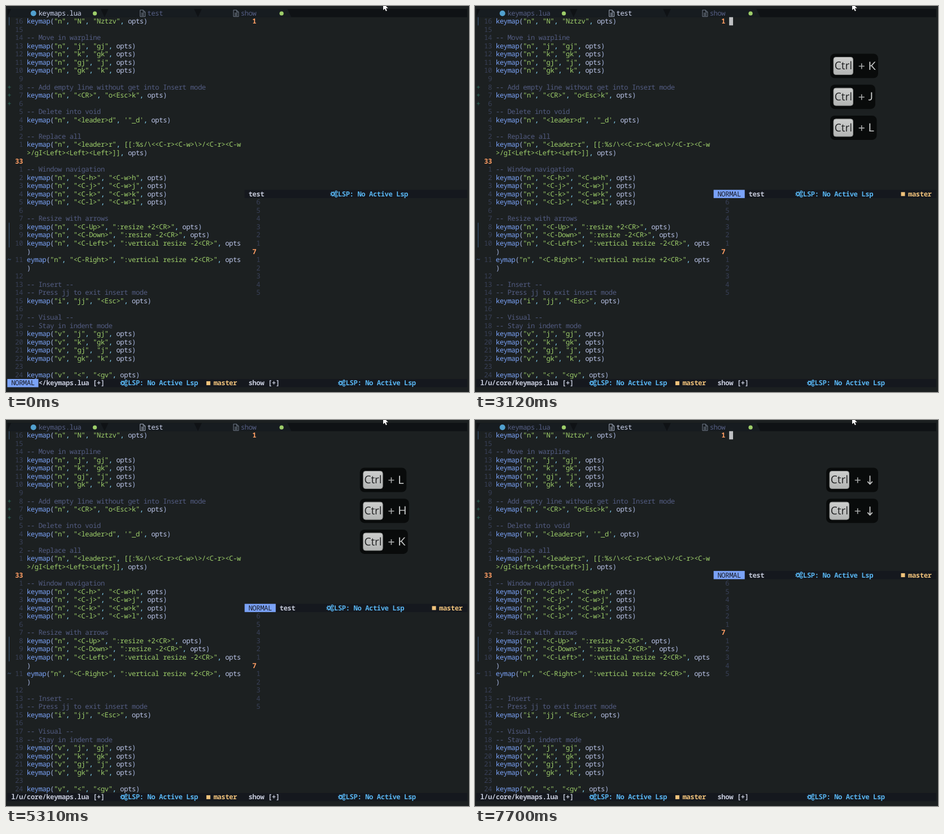
An HTML page for the animation above (8000 ms loop, 820 by 683 pixels).

```html
<!DOCTYPE html>
<html lang="en">
<head>
<meta charset="utf-8">
<title>Editor window navigation</title>
<style>
  html, body { margin: 0; width: 100%; height: 100%; overflow: hidden; background: #1c2021; }
  svg { display: block; width: 820px; height: 683px; }
  text {
    white-space: pre; text-rendering: geometricPrecision; letter-spacing: -.46px;
    font: 500 12.25px "Noto Sans Mono", "DejaVu Sans Mono", monospace;
  }
  .b { font-weight: 700; }
  .fn { fill: #7aa2f7; }
  .str { fill: #9ece6a; }
  .com { fill: #535c82; }
  .tab { fill: #565f85; }
  .tab-on { fill: #cdd4ee; }
  .comma { fill: #89ddff; }
  .par { fill: #a4b4de; }
  .id { fill: #bcc6ea; }
  .num { fill: #394058; }
  .cur { fill: #ff9e64; }
  .add { fill: #2c6e5e; }
  .mod { fill: #4a668f; }
  .lsp { fill: #58b4f0; }
  .git { fill: #f0c27b; }
  .mode { fill: #1a1c28; }
  .name { fill: #c3c8d8; }
  .ctrl, .key { letter-spacing: 0; }
  .ctrl { font: 500 19px "Open Sans", "Noto Sans", sans-serif; fill: #202122; }
  .key { font: 20px Lato, "Open Sans", sans-serif; fill: #c4c6c6; }
</style>
</head>
<body>
<svg viewBox="0 0 820 683" xmlns="http://www.w3.org/2000/svg">
  <defs>
    <linearGradient id="cap" x2="0" y2="1">
      <stop offset="0" stop-color="#cdcecd"/><stop offset="1" stop-color="#b3b5b4"/>
    </linearGradient>
    <g id="gears" fill="none" stroke="#58b4f0">
      <circle cx="4.6" cy="7.3" r="2.6" stroke-width="1.7"/>
      <circle cx="4.6" cy="7.3" r="4" stroke-width="1.2" stroke-dasharray="1.6 1.54"/>
      <circle cx="10.6" cy="4" r="1.7" stroke-width="1.3"/>
      <circle cx="10.6" cy="4" r="2.7" stroke-width=".8" stroke-dasharray="1.3 1.1"/>
      <circle cx="10.6" cy="10.8" r="1.7" stroke-width="1.3"/>
      <circle cx="10.6" cy="10.8" r="2.7" stroke-width=".8" stroke-dasharray="1.3 1.1"/>
    </g>
    <path id="file" d="M1 2h5.5l3.5 3.5v8H1zM6.5 2v3.5h3.5M3 7.5h5M3 9.5h5M3 11.5h5" fill="none" stroke-width="1"/>
  </defs>
  <g id="page"></g>
  <g id="live"></g>
  <g id="pills"></g>
  <path d="M668-5V7.2l2.8-2.5 2 4.4 2-.9-2-4.2h3.9z" fill="#fff"/>
</svg>
<script>
const CW = 6.89, RH = 14.55, LOOP = 8000;
const px = col => 2.3 + col * CW;
const py = row => 5.2 + row * RH;
const $ = id => document.getElementById(id);
const esc = s => s.replace(/&/g, '&amp;').replace(/</g, '&lt;');

const put = (col, row, text, cls) =>
  `<text x="${px(col)}" y="${py(row) + 11.4}" class="${cls}">${esc(text)}</text>`;
const box = (col, row, cols, fill) =>
  `<rect x="${px(col)}" y="${py(row)}" width="${cols * CW}" height="${RH}" fill="${fill}"/>`;
const use = (id, col, row, stroke) =>
  `<use href="#${id}" x="${px(col)}" y="${py(row)}" stroke="${stroke || 'none'}"/>`;

// Each line: sign, number, code, separated by tabs.
const code = String.raw`|	16	keymap("n", "N", "Nztzv", opts)
	15
	14	-- Move in warpline
	13	keymap("n", "j", "gj", opts)
	12	keymap("n", "k", "gk", opts)
	11	keymap("n", "gj", "j", opts)
	10	keymap("n", "gk", "k", opts)
	 9
+	 8	-- Add empty line without get into Insert mode
+	 7	keymap("n", "<CR>", "o<Esc>k", opts)
+	 6
	 5	-- Delete into void
	 4	keymap("n", "<leader>d", '"_d', opts)
	 3
	 2	-- Replace all
	 1	keymap("n", "<leader>r", [[:%s/\<<C-r><C-w>\>/<C-r><C-w
		>/gI<Left><Left><Left>]], opts)
	33
	 1	-- Window navigation
	 2	keymap("n", "<C-h>", "<C-w>h", opts)
	 3	keymap("n", "<C-j>", "<C-w>j", opts)
	 4	keymap("n", "<C-k>", "<C-w>k", opts)
	 5	keymap("n", "<C-l>", "<C-w>l", opts)
	 6
	 7	-- Resize with arrows
|	 8	keymap("n", "<C-Up>", ":resize +2<CR>", opts)
|	 9	keymap("n", "<C-Down>", ":resize -2<CR>", opts)
|	10	keymap("n", "<C-Left>", ":vertical resize -2<CR>", opts
		)
~	11	eymap("n", "<C-Right>", ":vertical resize +2<CR>", opts
		)
	12
	13	-- Insert --
	14	-- Press jj to exit insert mode
	15	keymap("i", "jj", "<Esc>", opts)
	16
	17	-- Visual --
	18	-- Stay in indent mode
	19	keymap("v", "j", "gj", opts)
	20	keymap("v", "k", "gk", opts)
	21	keymap("v", "gj", "j", opts)
	22	keymap("v", "gk", "k", opts)
	23
	24	keymap("v", "<", "<gv", opts)`.split('\n');

const TOKEN = /--.*|"[^"]*"|'[^']*'|\[\[.*|>\/gI.*\]\]|k?eymap|opts|[(),]/g;
function kind(tok) {
  if (tok.startsWith('--')) return 'com';
  if (/^["'[>]/.test(tok)) return 'str';
  if (tok.endsWith('eymap')) return 'fn';
  if (tok === 'opts') return 'id';
  return tok === ',' ? 'comma' : 'par';
}

function codeLine(line, i) {
  const [sign, num = '', src = ''] = line.split('\t'), row = i + 1;
  let out = put(2, row, num, num === '33' ? 'cur b' : 'num');
  if (sign === '|') out += `<rect x="5" y="${py(row)}" width="1.1" height="${RH}" fill="#3a5878"/>`;
  else if (sign) out += put(0, row, sign, sign === '+' ? 'add' : 'mod');
  for (const m of src.matchAll(TOKEN)) out += put(5 + m.index, row, m[0], kind(m[0]));
  return out;
}

function tabShape(a, b) {
  const top = py(0), bottom = py(1);
  return `<path d="M${px(a)} ${bottom}L${px(a + 1)} ${top}H${px(b - 1)}L${px(b)} ${bottom}z" fill="#171c20"/>`;
}

const dot = col => `<circle cx="${px(col + .5)}" cy="13.2" r="3.6" fill="#9ece6a"/>`;

$('page').innerHTML = box(0, 0, 118.2, '#0f1215') +
  tabShape(0, 25) + tabShape(25, 49) + tabShape(49, 73) +
  '<circle cx="48.6" cy="13" r="5" fill="#51a0cf"/>' + dot(22) + dot(70) +
  code.map(codeLine).join('') +
  put(63, 1, '1', 'cur b') + box(0, 45, 118.2, '#15181e');

function lsp(col, row) {
  return use('gears', col, row) + put(col + 2, row, 'LSP: No Active Lsp', 'lsp b');
}
function branch(col, row) {
  return `<rect x="${px(col) + 1.2}" y="${py(row) + 4}" width="7" height="7" fill="#f0c27b"/>` +
    put(col + 2, row, 'master', 'git b');
}
function mode(col, row) {
  return box(col, row, 8, '#7aa2f7') + put(col + 1, row, 'NORMAL', 'mode');
}
function rightBar(row, label, lspCol, focused) {
  return focused
    ? mode(61, row) + put(70, row, label, 'name b') + lsp(lspCol - 1, row) + branch(109, row)
    : put(62, row, label, 'name b') + lsp(lspCol, row);
}

function drawLive({ focus, split, cursor }) {
  const shade = w => focus === w ? 'tab-on' : 'tab';
  const ink = w => focus === w ? '#a3acbd' : '#737d8b';
  let out = put(8, 0, 'keymaps.lua', shade('left')) +
    use('file', 34, 0, ink('up')) + put(36, 0, 'test', shade('up')) +
    use('file', 58, 0, ink('down')) + put(60, 0, 'show', shade('down'));

  out += focus === 'left'
    ? mode(0, 45) + put(8, 45, '</keymaps.lua [+]', 'name b')
    : put(1, 45, 'l/u/core/keymaps.lua [+]', 'name b');
  out += lsp(29, 45) + branch(51, 45);
  out += box(61, split, 57.2, '#15181e') + rightBar(split, 'test', 83, focus === 'up');
  out += rightBar(45, 'show [+]', 85, focus === 'down');

  for (let i = 1; i <= 12; i++) {
    out += i === 7 ? put(63, split + i, '7', 'cur b') : put(64, split + i, '' + Math.abs(7 - i), 'num');
  }
  const spot = { left: [5, 18], up: [65, 1], down: [66, split + 7] }[focus];
  if (cursor) out += box(...spot, 1, '#bfc1c3');
  $('live').innerHTML = out;
}

// Key, time shown, start of fade, time gone.
const presses = [
  ['L', 1240, 4180, 4340], ['J', 2140, 5160, 5310], ['K', 3050, 6070, 6140],
  ['H', 3790, 6790, 6870], ['L', 4500, 7530, 7610],
  ['↓', 7210, 9000, 9000], ['↓', 7610, 9000, 9000]
];
const widths = { J: 80, L: 82.5, K: 85, H: 87, '↓': 92 };

function pill(key, x, y, alpha) {
  const glyph = key === '↓'
    ? `<path d="M${x + 77.5} ${y + 14}v15m-4.3-4.6l4.3 4.6 4.3-4.6" fill="none" stroke="#c4c6c6" stroke-width="1.8"/>`
    : `<text x="${x + 67.5}" y="${y + 28}" class="key">${key}</text>`;
  return `<g opacity="${alpha}">
    <rect x="${x}" y="${y}" width="${widths[key]}" height="43" rx="8" fill="#090b0b"/>
    <rect x="${x + 6}" y="${y + 6}" width="34.5" height="31" rx="4" fill="url(#cap)" stroke="#8a8c8b"/>
    <text x="${x + 7.7}" y="${y + 27.6}" class="ctrl">Ctrl</text>
    <path d="M${x + 50.7} ${y + 22}h10m-5-5v10" stroke="#a9abab" stroke-width="1.6"/>
    ${glyph}</g>`;
}

function fade(t, start, gone) {
  if (t < start) return 1;
  return t >= gone ? 0 : gone - t > 80 ? .65 : .25;
}

const at = (t, steps) => steps.filter(s => s[0] <= t).pop()[1];
const focusSteps = [[0, 'left'], [1240, 'up'], [2220, 'down'], [3120, 'up'], [3860, 'left'], [4590, 'up']];
const splitSteps = [[0, 22], [7280, 20], [7700, 18]];
const cursorSteps = [[0, 0], [740, 1], [1990, 0], [2220, 1], [2980, 0], [3120, 1], [5310, 0], [6070, 1]];
const edgeSteps = [[0, 631.3], [3050, 629], [3790, 626.7], [7210, 622]];

let lastLive, lastPills;
function frame() {
  const t = (performance.now() - begin) % LOOP;
  const live = { focus: at(t, focusSteps), split: at(t, splitSteps), cursor: at(t, cursorSteps) };
  const liveKey = JSON.stringify(live);
  if (liveKey !== lastLive) drawLive(live);
  lastLive = liveKey;

  const shown = presses.filter(p => p[1] <= t).reverse();
  const x = at(t, edgeSteps);
  const markup = shown.map(([key, , start, gone], i) => {
    const alpha = fade(t, start, gone);
    return alpha ? pill(key, x, 84.5 + i * 54.7, alpha) : '';
  }).join('');
  if (markup !== lastPills) $('pills').innerHTML = markup;
  lastPills = markup;
  requestAnimationFrame(frame);
}
const begin = performance.now();
frame();
</script>
</body>
</html>
```
